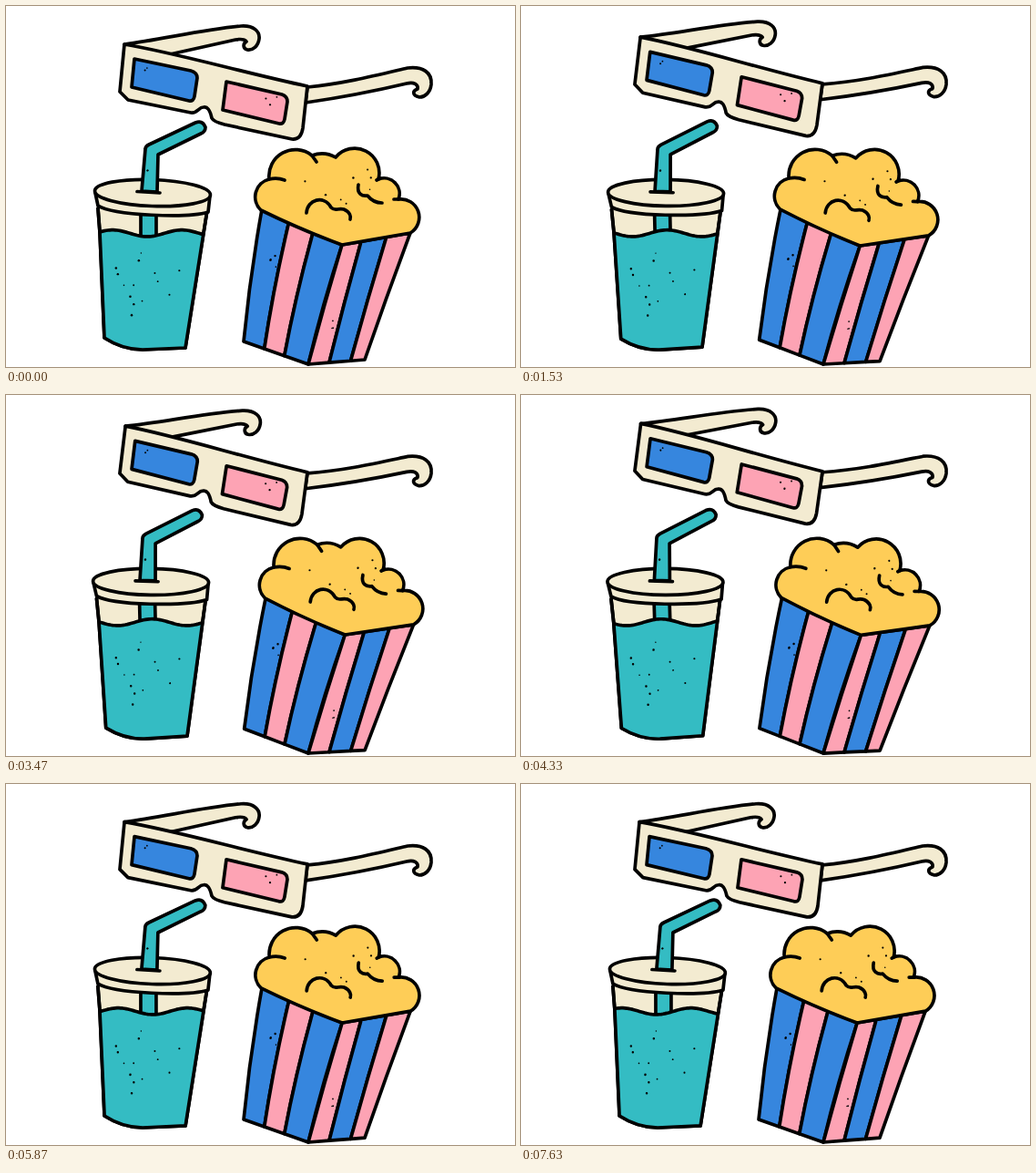
Write an HTML page that moves like this. It is 559 px wide and 396 px high and loops after 7670 ms.

```html
<!DOCTYPE html>
<html lang="en">
<head>
<meta charset="utf-8">
<title>Movie night</title>
<style>
  html, body { margin: 0; width: 100%; height: 100%; overflow: hidden; background: #fff; }
  svg { display: block; width: 100%; height: 100%; }
  .ink { stroke: #000; stroke-width: 3.7; stroke-linejoin: round; stroke-linecap: round; }
  .cream { fill: #f3ebd1; }
  .teal { fill: #34bcc3; }
  .blue { fill: #3686de; }
  .pink { fill: #fda3b4; }
  .corn { fill: #fecd57; }
  .line { fill: none; }
</style>
</head>
<body>
<svg viewBox="0 0 559 396">
  <defs>
    <path id="body" d="M101 222L103 248 108 364Q128 377 150 377L197 375 217 249 221 224"/>
    <clipPath id="inside"><use href="#body"/></clipPath>
  </defs>

  <g id="glasses" class="ink">
    <path class="cream" d="M130 42C170 37 215 26 258 22C272 21 279 28 278 36C277 44 271 49 265 48C260 47 260 41 264 39C262 36 258 36 252 37L180 53Z"/>
    <path class="cream" d="M331 89C372 85 407 76 441 68C458 66 468 73 467 86C466 95 460 100 454 100C446 98 446 93 452 91C453 86 448 83 440 85Q385 98 329 106Z"/>
    <path class="cream" d="M130 42C185 51 260 73 331 88L326 134Q324 147 314 146L240 130Q228 127 226 123C224 114 221 110 217 111C211 111 211 118 203 117L134 103 125 94Z"/>
    <path class="blue" d="M141 58L203 71Q210 73 210 79L207 99Q206 105 201 104L138 89Z"/>
    <path class="pink" d="M242 83L303 97Q309 99 309 105L306 124Q305 130 300 129L238 114Z"/>
  </g>

  <g id="cup" class="ink">
    <use href="#body" class="cream"/>
    <path class="teal" d="M148 226H165V262H148Z"/>
    <path id="liquid" class="teal" clip-path="url(#inside)"/>
    <use href="#body" class="line"/>
    <path class="cream" d="M98 205L101 219C118 230 200 233 222 226L224 208Z"/>
    <ellipse class="cream" cx="161" cy="205" rx="63.5" ry="14.5" transform="rotate(2 161 205)"/>
    <path class="teal" d="M149 203L153 157Q153 154 157 152L208 128Q216 125 219 133Q219 138 214 140L167 163 166 204Z"/>
    <path class="line" d="M144 203.500L169 205"/>
  </g>

  <g id="popcorn" class="ink">
    <g id="box"></g>
    <path class="corn" d="M280 224A20 20 0 0 1 289 190A29 29 0 0 1 336 164A30 30 0 0 1 362 166A27 27 0 0 1 409 190A17 17 0 0 1 431 212A20 20 0 0 1 444 249L369 262Q325 246 280 224Z"/>
    <path class="line" d="M289 190Q298 188 306 191M336 164L341 171M409 190L407 191M431 212L426 212"/>
    <path class="line" d="M330 227C331 212 349 207 357 221C362 226 364 221 371 223C378 226 379 231 378 234M387 196C385 206 391 209 397 208C401 213 406 216 413 216"/>
  </g>
</svg>
<script>
const SVG_NS = 'http://www.w3.org/2000/svg';
const LOOP = 7670, FPS = 30, STEPS_PER_FRAME = 5 / 12, SWING = 24, WAVE = 12;
const byId = id => document.getElementById(id);

function add(parent, tag, attributes) {
  const node = document.createElementNS(SVG_NS, tag);
  for (const [key, value] of Object.entries(attributes)) node.setAttribute(key, value);
  byId(parent).append(node);
}

const mix = (a, b, k) => a.map((v, i) => v + (b[i] - v) * k);

// One side of the box: stripes between matching cuts of its top and bottom edge
function boxSide(top, bottom, topCuts, bottomCuts, colours, bow) {
  colours.forEach((colour, i) => {
    const [a, b] = [i, i + 1].map(k => mix(...top, topCuts[k]));
    const [d, c] = [i, i + 1].map(k => mix(...bottom, bottomCuts[k]));
    const bend = (p, q) => mix(p, q, 0.5).map((v, axis) => axis ? v : v - bow);
    add('box', 'path', { class: colour, d: `M${a}L${b}Q${bend(b, c)} ${c}L${d}Q${bend(d, a)} ${a}Z` });
  });
}
boxSide([[281, 223], [369, 262]], [[261, 368], [332, 393]],
  [0, .34, .64, 1], [0, .32, .63, 1], ['blue', 'pink', 'blue'], 3);
boxSide([[369, 262], [444, 249]], [[332, 393], [394, 388]],
  [0, .28, .65, 1], [0, .37, .75, 1], ['pink', 'blue', 'pink'], 1);

let seed = 7;
function random() {
  seed = seed * 16807 % 2147483647;
  return seed / 2147483647;
}

function scatter(id, count, x, y, rx, ry) {
  for (let i = 0; i < count; i++) {
    const angle = random() * 2 * Math.PI, reach = Math.sqrt(random());
    add(id, 'circle', {
      cx: x + rx * reach * Math.cos(angle),
      cy: y + ry * reach * Math.sin(angle),
      r: 0.7 + 0.6 * random(),
      stroke: 'none'
    });
  }
}
scatter('glasses', 2, 152, 68, 3, 3);
scatter('glasses', 3, 295, 103, 12, 7);
scatter('cup', 14, 158, 308, 44, 46);
scatter('cup', 2, 156, 178, 2, 4);
scatter('popcorn', 8, 368, 194, 56, 24);
scatter('popcorn', 4, 292, 281, 5, 11);
scatter('popcorn', 3, 356, 353, 4, 16);

// Steps of 80 ms that fall on a 30 fps clock
function stepAt(time) {
  const frame = Math.floor((time + 3.4) * FPS / 1000);
  return Math.floor(frame * STEPS_PER_FRAME);
}

function rotate(id, angle, x, y) {
  byId(id).setAttribute('transform', `rotate(${angle} ${x} ${y})`);
}

// The surface stays level while the cup leans
function liquidPath(step, lean) {
  const slope = Math.tan(lean * Math.PI / 180);
  let path = 'M96 385';
  for (let x = 96; x <= 226; x += 2) {
    const phase = 2 * Math.PI * ((x - 155) / 76 - step / WAVE);
    path += `L${x} ${(249.3 - (x - 158) * slope + 3.6 * Math.cos(phase)).toFixed(2)}`;
  }
  return path + 'L226 385Z';
}

function render(time) {
  const step = stepAt(time);
  const swing = (1 - Math.cos(2 * Math.PI * step / SWING)) / 2;
  const lean = -3.55 * swing;
  rotate('glasses', 3.6 * swing, 467, 87);
  rotate('popcorn', 3.9 * swing, 331, 393);
  rotate('cup', lean, 158, 288);
  byId('liquid').setAttribute('d', liquidPath(step, lean));
}

const origin = performance.now();
function tick() {
  render((performance.now() - origin) % LOOP);
  requestAnimationFrame(tick);
}
render(0);
requestAnimationFrame(tick);
</script>
</body>
</html>
```
